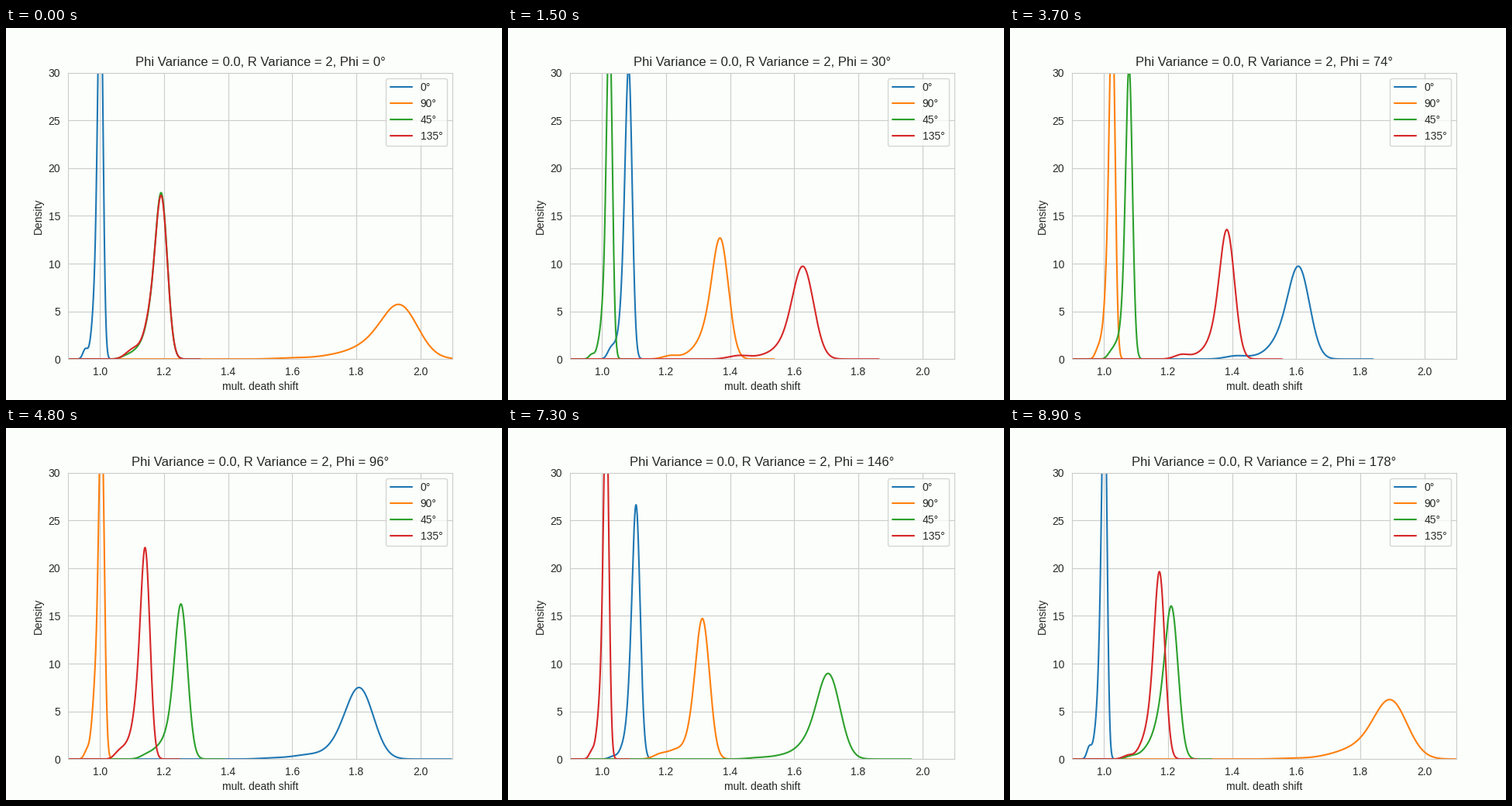
Animation of 640 by 480 pixels, one loop 9 s. Source, as a matplotlib script:

```python
import matplotlib.pyplot as plt
import numpy as np
from matplotlib.animation import FuncAnimation
from numpy.polynomial import Polynomial

BACK = "#fbfefa"
plt.rcParams.update({
    "font.family": "Liberation Sans",
    "figure.facecolor": BACK, "axes.facecolor": BACK, "savefig.facecolor": BACK,
    "axes.edgecolor": ".8", "axes.grid": True, "axes.axisbelow": True,
    "grid.color": ".8", "text.color": ".15", "axes.labelcolor": ".15",
    "xtick.color": ".15", "ytick.color": ".15",
    "xtick.bottom": False, "ytick.left": False,
    "lines.solid_capstyle": "round",
})

FRAMES, STEP = 90, 2  # degrees of phi per frame
COLORS = {0: "#1f77b4", 90: "#ff7f0e", 45: "#2ca02c", 135: "#d62728"}

# Peak position and height by how far phi is from the line's direction.
TURN = np.arange(0, 91, 15)
shift = Polynomial.fit(TURN, [1.001, 1.023, 1.082, 1.192, 1.367, 1.626, 1.932], 5)
HEIGHT = [40, 38, 31, 17, 13.5, 10, 5.8]

# Left-skewed sample: bump offsets in bandwidths, and their weights.
OFFSETS = np.array([.07, -1.7, -3.5, -5.6])
WEIGHTS = np.array([.8, .14, .04, .02])


def density(angle, phi):
    rng = np.random.default_rng(1000 * phi + angle)
    turn = 90 - abs(90 - abs(phi - angle) % 180)
    peak = shift(turn)
    height = np.interp(turn, TURN, HEIGHT) * rng.uniform(.93, 1.07)
    bw = WEIGHTS[0] / (height * np.sqrt(2 * np.pi))
    mid = peak + bw * OFFSETS * rng.uniform(.9, 1.1, 4)
    top = height * WEIGHTS / WEIGHTS[0] * rng.uniform([.96, .7, .6, .4], [.98, 1.3, 1.4, 1.6])

    x = np.linspace(.9, peak + .07 + .27 * (peak - 1), 1000)
    y = top @ np.exp(-.5 * ((x - mid[:, None]) / bw) ** 2)
    return x, y


fig, ax = plt.subplots(figsize=(6.4, 4.8), dpi=100)
lines = {a: ax.plot([], [], color=c, label=f"{a}°")[0] for a, c in COLORS.items()}
ax.set(xlim=(.9, 2.1), ylim=(0, 30), xlabel="mult. death shift", ylabel="Density")
ax.legend(loc="upper right")
title = ax.set_title("")


def update(frame):
    phi = frame * STEP
    for angle, line in lines.items():
        line.set_data(*density(angle, phi))
    title.set_text(f"Phi Variance = 0.0, R Variance = 2, Phi = {phi}°")
    return [*lines.values(), title]


anim = FuncAnimation(fig, update, frames=FRAMES, interval=100, repeat=True)
plt.show()
```
